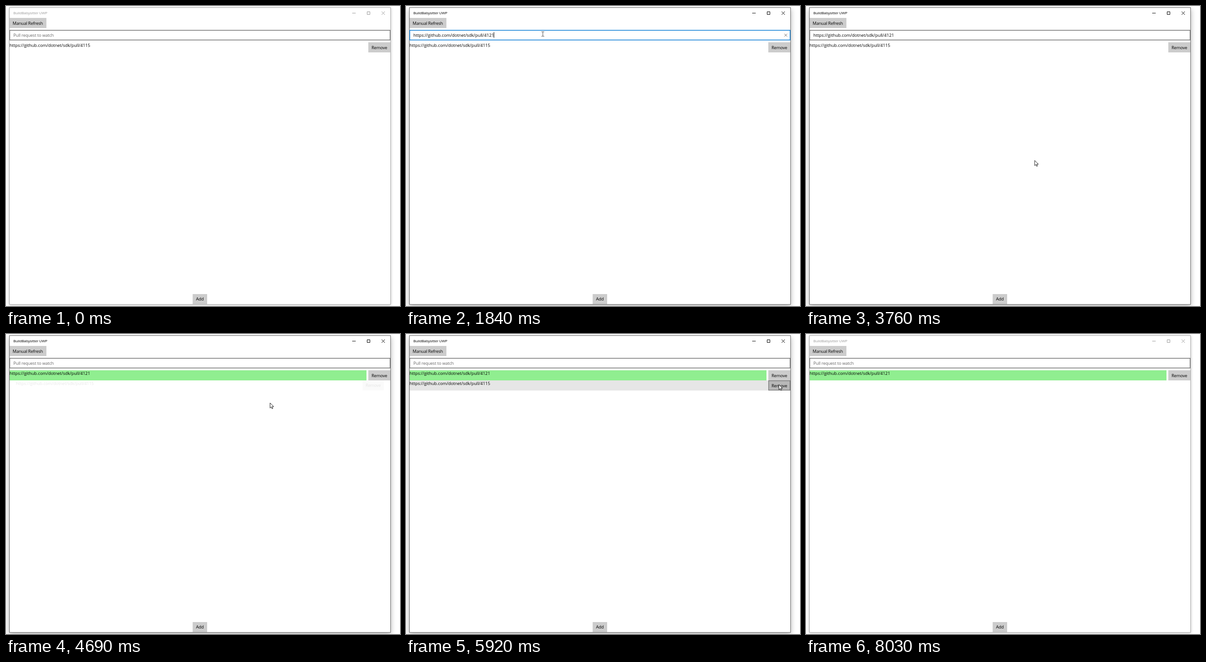
Recreate the animation shown at these times as an HTML page. Size 858 by 653 pixels, loop 8100 ms.

```html
<!DOCTYPE html>
<html lang="en">
<head>
<meta charset="utf-8">
<title>Build watcher</title>
<style>
  html, body { margin: 0; width: 100%; height: 100%; overflow: hidden; background: #fff; }
  #frame {
    position: absolute; left: 7px; top: 3px; width: 829px; height: 645px;
    border: 1px solid #aaa; background: #fff; box-shadow: 0 1px 6px rgba(0,0,0,.24);
  }
  #frame.active { border-color: #666; box-shadow: 0 4px 11px rgba(0,0,0,.3); }
  svg { position: absolute; left: 0; top: 0; }
  text { font: 9.3px "Open Sans", "Noto Sans", sans-serif; letter-spacing: -.15px; }
  .url { letter-spacing: 0; }
  .hint { fill: #666; }
  #chrome { color: #999; }
  #chrome.active { color: #000; }
  #chrome text { font-size: 8px; fill: currentColor; }
  #chrome path { fill: none; stroke: currentColor; }
  .btn { fill: #ccc; }
  .hot { fill: #b8b8b8; stroke: #7a7a7a; stroke-width: 1.4; }
</style>
</head>
<body>
<div id="frame"></div>
<svg width="858" height="653" viewBox="0 0 858 653">
  <g id="chrome">
    <text x="16" y="18">BuildBabysitter UWP</text>
    <path d="M754 15.5h7.5M786.5 12.5h6v6h-6zM818 12l7 7m0-7l-7 7"/>
  </g>
  <rect class="btn" x="8" y="26" width="80" height="22"/>
  <text x="14.5" y="41">Manual Refresh</text>

  <rect id="box" x="8.2" y="52.8" width="828.3" height="21.2" fill="#fff" stroke-width="1.6"/>
  <text id="hint" class="hint" x="16" y="66.5">Pull request to watch</text>
  <text id="entry" class="url" x="16" y="66.5">https://github.com/dotnet/sdk/pull/4121</text>
  <path id="caret" stroke="#000"/>
  <path id="clear" d="M824 60.5l6 6m0-6l-6 6" stroke="#555" stroke-width=".9"/>

  <rect id="green" x="8" y="79" width="777" height="22" fill="#90ee90"/>
  <text id="first" class="url" x="7.7" y="89"></text>
  <rect class="btn" x="789" y="79" width="48" height="22"/>
  <text x="796" y="93.5">Remove</text>

  <g id="second">
    <rect id="rowHover" x="8" y="101" width="829" height="22" fill="#e6e6e6"/>
    <text class="url" x="7.7" y="111">https://github.com/dotnet/sdk/pull/4115</text>
    <rect class="btn" x="789" y="101" width="48" height="22"/>
    <rect id="removeHot" class="hot" x="789.7" y="101.7" width="46.6" height="20.6"/>
    <text x="796" y="115.5">Remove</text>
  </g>

  <rect class="btn" x="406.5" y="627" width="31.5" height="22"/>
  <rect id="addHot" class="hot" x="407.2" y="627.7" width="30.1" height="20.6"/>
  <text x="413.8" y="641">Add</text>

  <g id="cursor">
    <path id="arrow" d="M0 0V11.2L2.6 8.8L4.3 12.8L6.1 12L4.4 8.1H8Z" fill="#fff" stroke="#000" stroke-width=".9"/>
    <path id="beam" d="M-3 -5h2.3L0 -4.3L.7 -5H3M0 -4.3V4.3M-3 5h2.3L0 4.3L.7 5H3" fill="none" stroke="#222" stroke-width=".85"/>
  </g>
</svg>
<script>
const LOOP = 8100, TICK = 77.14;
const $ = id => document.getElementById(id);
const show = (id, on) => { $(id).style.display = on ? "" : "none"; };
const progress = (t, from, to) => Math.min(1, Math.max(0, (t - from) / (to - from)));
const smooth = p => p * p * (3 - 2 * p);

// Pointer moves: start ms, end ms, destination x, y
const entrance = [352, 640];
const moves = [
  [70, 840, 301, 55],
  [1070, 1150, 298, 61],
  [1900, 2300, 305, 68],
  [2380, 2760, 531, 607],
  [2760, 3220, 412, 643],
  [3220, 3610, 498, 350],
  [3700, 4070, 498, 202],
  [4215, 4220, 407, 634],
  [4455, 4460, 425, 634],
  [4540, 4690, 575, 150],
  [4690, 5070, 590, 143],
  [5160, 5540, 812, 110],
  [6700, 7400, 820, 564],
  [7400, 7640, 788, 655]
];

function pointer(t) {
  let [x, y] = entrance;
  for (const [from, to, toX, toY] of moves) {
    const p = smooth(progress(t, from, to));
    x += (toX - x) * p;
    y += (toY - y) * p;
  }
  return [x, y];
}

// The second row fades in while growing, then fades out while shrinking
function rowPop(t) {
  const enter = progress(t, 4610, 5070), leave = progress(t, 6560, 6860);
  return {
    scale: 1 - .042 * (1 - enter) - .16 * leave,
    alpha: enter ** 1.4 * (1 - leave ** 1.25)
  };
}

function render(t) {
  const during = (a, b) => t >= a && t < b;
  // The screen refreshes in even ticks
  const tick = Math.max(0, Math.floor((t + 20) / TICK) * TICK - 10);
  const [x, y] = pointer(tick);
  const pointing = during(70, 7630);
  const over = (x0, y0, x1, y1) => pointing && x > x0 && x < x1 && y > y0 && y < y1;

  const inBox = over(8, 52, 837, 75);
  const active = during(1300, 8030);
  const focus = during(1300, 3140);
  const typed = during(1840, 4220);
  const added = t >= 4220;

  $("frame").classList.toggle("active", active);
  $("chrome").classList.toggle("active", active);

  $("box").setAttribute("stroke", focus ? "#1683d8" : inBox ? "#111" : "#7a7a7a");
  show("hint", !typed);
  show("entry", typed);
  show("caret", focus);
  $("caret").setAttribute("d", `M${typed ? 191.5 : 16.5} 57v12`);
  show("clear", focus && typed);

  show("green", added);
  $("first").textContent = "https://github.com/dotnet/sdk/pull/" + (added ? 4121 : 4115);

  const { scale, alpha } = rowPop(tick);
  $("second").setAttribute("opacity", alpha);
  $("second").setAttribute("transform",
    `translate(422.5 112) scale(${scale}) translate(-422.5 -112)`);
  show("rowHover", over(8, 101, 837, 123) && t < 6620);
  show("removeHot", over(789, 101, 837, 123));
  show("addHot", over(406, 627, 438, 649) && !added);

  show("cursor", pointing);
  $("cursor").setAttribute("transform", `translate(${x.toFixed(1)} ${y.toFixed(1)})`);
  show("beam", inBox);
  show("arrow", !inBox);
}

const start = performance.now();
function loop() {
  render((performance.now() - start) % LOOP);
  requestAnimationFrame(loop);
}
loop();
</script>
</body>
</html>
```
